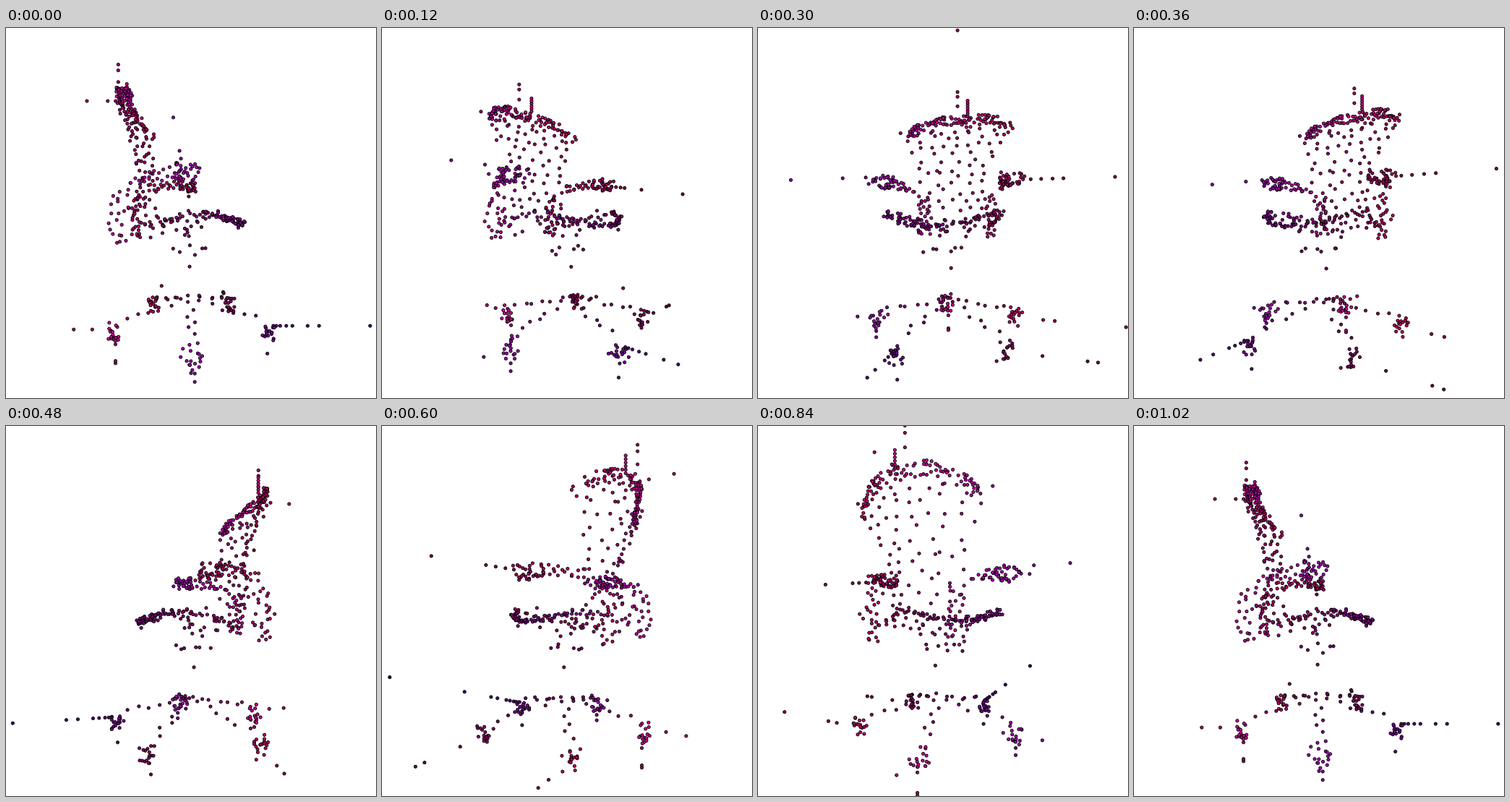
Animation, 512 px wide and 512 px high, one loop 1.08 s. Source, as a matplotlib script:

```python
import numpy as np
import matplotlib.pyplot as plt
from matplotlib.animation import FuncAnimation

SIZE, DPI = 512, 100
FRAMES, STEP_MS = 18, 60
CAM = 443          # camera distance and focal length, px
MID = SIZE / 2

rng = np.random.default_rng(12)
cloud, gains = [], []


def add(x, y, z, gain=1.0, jitter=0.0):
    """Add points: x to the front, y up, z to the chair's purple side."""
    pts = np.column_stack(np.broadcast_arrays(*map(np.atleast_1d, (x, y, z)))).astype(float)
    pts += rng.normal(0, 1, pts.shape) * jitter
    cloud.append(pts)
    gains.append(np.full(len(pts), gain))


def spread(lo, hi, n):
    return rng.uniform(lo, hi, n)


def rim(u):
    """Curved top edge of the backrest for u in -1..1."""
    return -99 + 36 * u**2, 160 - 35 * np.abs(u) ** 3.5, 87 * u - 3


def backrest():
    x, y, z = rim(spread(-1, 1, 84))
    add(x, y - spread(-2, 8, 84), z, 1, 1.5)
    x, y, z = rim(np.linspace(-.95, .95, 24))
    add(x + 3, y - spread(8, 18, 24), z * .96, .9, 1.5)
    # sparse shell, narrowing downwards
    for j, y in enumerate(np.linspace(136, 8, 11)):
        n = 8 if j < 3 else 5
        half = np.interp(y, [0, 60, 130, 140], [42, 48, 74, 80])
        v = np.linspace(-1, 1, n) + (j % 2 - .5) * .2
        x = np.interp(y, [0, 50, 100, 140], [-78, -70, -80, -96])
        add(x + 16 * v**2, y, half * v, .78, 2.5)


def armrest(side):
    n = 30
    a = spread(0, 2 * np.pi, n)
    add(spread(-18, 9, n), 46 + 8 * np.sin(a), side * (92 + 15 * np.cos(a)), 1, 1.5)
    u = np.linspace(0, 1, 20)
    add(-16 - 54 * u, 46 - 9 * u + spread(-6, 7, 20), side * (90 - 18 * u), 1, 2)
    # upright behind the seat
    n = 24
    add(spread(-96, -70, n), np.linspace(28, -38, n), side * spread(46, 66, n), .92, 1.5)


def seat():
    u = np.linspace(-1, 1, 62)
    add(70 - 48 * u**2, -15 + 16 * u**2, 77 * u, .95, 2.6)
    u = np.linspace(0, 1, 13)
    for side in (1, -1):
        add(22 - 92 * u, 1 - 19 * u, side * (77 - 17 * u), .85, 3)
    add(spread(-70, 20, 24), spread(-34, -3, 24), spread(-55, 55, 24), .8)
    # underside and column
    a = np.arange(6) * np.pi / 3 + .4
    add(24 * np.cos(a), -48 - 5 * (np.arange(6) % 2), 24 * np.sin(a), .75, 2)
    add(-2, -76, -11, .75)


def base():
    r = np.array([14, 30, 46, 60, 74, 90])
    y = np.interp(r, [0, 31, 60, 95], [-115, -126, -133, -138])
    off = 4 * (-1.0) ** np.arange(6)
    for k in range(5):
        a = np.pi / 2 + k * 2 * np.pi / 5
        c, s = np.cos(a), np.sin(a)
        add(r * c - off * s, y, r * s + off * c - 7, .76, 1)
        add(106 * c + rng.normal(0, 5, 17), spread(-167, -142, 17),
            106 * s - 7 + rng.normal(0, 5, 17), 1)


def strays():
    """Loose points that trail off along the axes."""
    g = .76
    # above and behind the backrest
    add(-100, [180, 196, 204, 308], 3, g)
    add(-92, np.linspace(164, 185, 6), -16, 1)
    add([-145, -116, -105], 156, -3, g)
    add(-68, 133, 93, g)
    # beside the armrests
    add(-10, 54, [125, 165, 262], g)
    add(-10, 44, 120, g)
    add(-6, 44, [-117, -130, -144, -157, -216, -408], g)
    # around the castors
    add([108, 112, 117, 125, 133, 153, 168, 235, 480], -148, 23, g)
    add([-128, -152], -151, 28, g)
    add(0, -155, 133, g)
    add(-63, -156, [-134, -150, -242], g)
    add(63, -155, [-130, -175, -185], g)
    add(-100, [-174, -196, -199], 19, g)
    add(4, [-172, -181], 100, g)
    add(100, -184, 24, g)


backrest()
armrest(1)
armrest(-1)
seat()
base()
strays()

P = np.vstack(cloud)
gain = np.concatenate(gains)[:, None]
X, Y, Z = P.T
rgb = np.column_stack([158 - .42 * X, 0 * X, 132 + .4 * Z])
rgb = np.clip(rgb * gain, [15, 0, 50], [205, 0, 180]) / 255

fig = plt.figure(figsize=(SIZE / DPI, SIZE / DPI), dpi=DPI, facecolor="white")
ax = fig.add_axes([0, 0, 1, 1])
ax.set(xlim=(0, SIZE), ylim=(SIZE, 0))
ax.axis("off")
dots = ax.scatter(X, Y, s=9, c=rgb, edgecolors="black", linewidths=.6)


def draw(i):
    a = 2 * np.pi * i / (FRAMES - 1)   # the last pose equals the first
    c, s = np.cos(a), np.sin(a)
    x, z = X * c - Z * s, X * s + Z * c
    seen = np.flatnonzero(z < CAM * .9)
    order = seen[np.argsort(z[seen])]
    k = CAM / (CAM - z[order])
    dots.set_offsets(np.column_stack([MID + x[order] * k, MID - Y[order] * k]))
    dots.set_facecolor(rgb[order])
    return (dots,)


anim = FuncAnimation(fig, draw, frames=FRAMES, interval=STEP_MS, repeat=True,
                     repeat_delay=0, blit=False)
plt.show()
```
